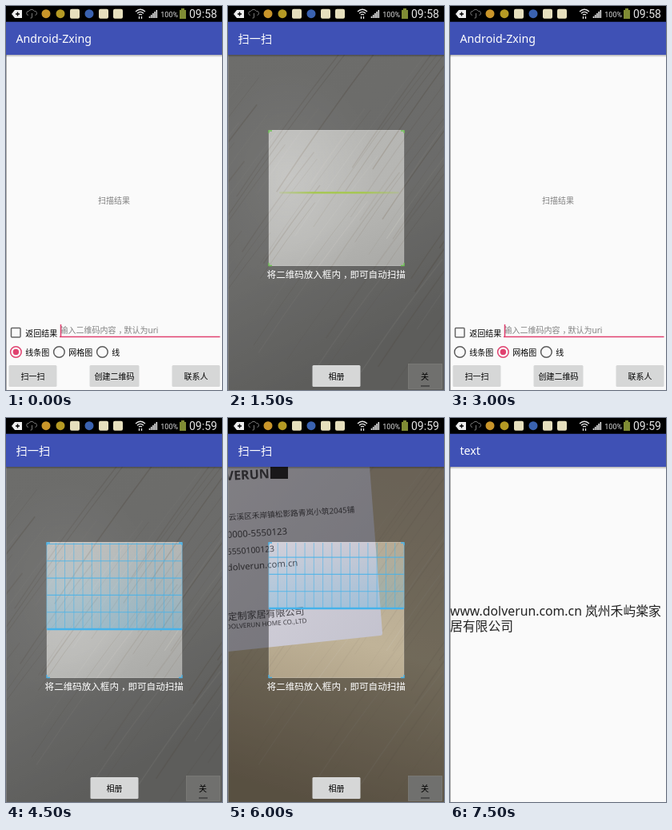
An HTML page that plays this animation: 270 px wide and 480 px high, repeating every 8 s.

```html
<!DOCTYPE html>
<html lang="zh">
<head>
<meta charset="utf-8">
<title>Scanner demo</title>
<style>
  html, body { margin: 0; width: 100%; height: 100%; overflow: hidden; background: #000; }
  svg { display: block; width: 100%; height: 100%; }
  text { font: 10px "Noto Sans", "Noto Sans CJK SC", "Noto Sans CJK", sans-serif; white-space: pre; }
  .mid { text-anchor: middle; }
  .title { font-size: 14.2px; fill: #fff; }
  .clock { font: 14px Roboto, sans-serif; fill: #e4e4e4; }
  .charge { font: 9px Roboto, sans-serif; fill: #ddd; }
  .result { font-size: 15.8px; fill: #222; }
  .grey { fill: #808080; }
</style>
</head>
<body>
<svg viewBox="0 0 270 480" preserveAspectRatio="none">
  <defs>
    <linearGradient id="desk" x1="0" y1="0" x2=".35" y2="1">
      <stop offset="0" stop-color="#b8b8b5"/><stop offset=".6" stop-color="#b6b6b3"/><stop offset="1" stop-color="#9d9d9a"/>
    </linearGradient>
    <linearGradient id="tan" x1=".6" y1="0" x2=".4" y2="1">
      <stop offset="0" stop-color="#b3a692"/><stop offset=".5" stop-color="#c0b398"/><stop offset="1" stop-color="#96876f"/>
    </linearGradient>
    <linearGradient id="paper" x1="0" y1="0" x2="1" y2="1">
      <stop offset="0" stop-color="#dad7df"/><stop offset="1" stop-color="#c3c2ce"/>
    </linearGradient>
    <radialGradient id="glare">
      <stop offset="0" stop-color="#fff" stop-opacity=".22"/><stop offset="1" stop-color="#fff" stop-opacity="0"/>
    </radialGradient>
    <linearGradient id="beam">
      <stop offset="0" stop-color="#a4c84a" stop-opacity=".2"/><stop offset=".3" stop-color="#a4c84a"/>
      <stop offset=".7" stop-color="#a4c84a"/><stop offset="1" stop-color="#a4c84a" stop-opacity=".2"/>
    </linearGradient>
    <linearGradient id="tint" x2="0" y2="1">
      <stop offset="0" stop-color="#45b2ea" stop-opacity="0"/><stop offset="1" stop-color="#45b2ea" stop-opacity=".28"/>
    </linearGradient>
    <linearGradient id="shadow" x2="0" y2="1">
      <stop offset="0" stop-opacity=".3"/><stop offset="1" stop-opacity="0"/>
    </linearGradient>
    <clipPath id="body"><rect y="61" width="270" height="419"/></clipPath>
    <g id="grain" fill="none"></g>
  </defs>

  <g id="home">
    <rect y="61" width="270" height="419" fill="#fafafa"/>
    <text class="mid grey" x="135" y="246.8">扫描结果</text>
    <rect x="6.5" y="402.5" width="11.5" height="11.5" rx="1" fill="none" stroke="#666" stroke-width="1.5"/>
    <text x="24.3" y="412.6">返回结果</text>
    <text class="grey" x="67.5" y="409.3">输入二维码内容<tspan dx="3">，</tspan><tspan dx="-3">默认为uri</tspan></text>
    <path d="M68.5 398V413M67 413.4H267.5" stroke="#e0416f" stroke-width="1.5"/>
    <g id="radios"></g>
    <g id="buttons"></g>
  </g>

  <g id="scan">
    <g clip-path="url(#body)">
      <g id="bareDesk">
        <rect y="61" width="270" height="419" fill="url(#desk)"/>
        <use href="#grain"/>
        <ellipse cx="75" cy="215" rx="110" ry="140" fill="url(#glare)"/>
      </g>
      <g id="cardDesk">
        <rect y="61" width="270" height="419" fill="url(#tan)"/>
        <use href="#grain" opacity=".5"/>
        <path d="M0 61H177L193 269Q193 272 190 272L0 292Z" fill="url(#paper)"/>
        <g id="cardText" fill="#47454b"></g>
        <rect x="53" y="61" width="22" height="15" fill="#2b292c"/>
      </g>
      <path d="M0 61H270V480H0ZM51 155V325H220V155Z" fill="#000" fill-opacity=".41" fill-rule="evenodd"/>
    </g>
    <rect id="beamLine" x="64" y="232.2" width="150" height="2.2" rx="1.1" fill="url(#beam)"/>
    <g id="mesh" fill="none" stroke="#45b2ea"></g>
    <rect x="51" y="155.5" width="169" height="169" fill="none" stroke="#ddd" stroke-opacity=".35" stroke-width=".7"/>
    <path d="M51 159V156H55M216 156H220V159M51 321V324.5H55M216 324.5H220V321" id="corners" fill="none" stroke-width="1.3"/>
    <text class="mid" x="135.2" y="340.3" fill="#fff" style="font-size:11.55px">将二维码放入框内<tspan dx="3">，</tspan><tspan dx="-3">即可自动扫描</tspan></text>
    <g id="scanButtons"></g>
    <rect x="225.5" y="447.5" width="42" height="31" fill="#70706e" stroke="#80807d" stroke-width=".7"/>
    <text class="mid" x="246" y="466.8">关</text>
    <path d="M241 475H252" stroke="#333" stroke-width="1.3"/>
  </g>

  <g id="result">
    <rect y="61" width="270" height="419" fill="#fafafa"/>
    <text class="result" x="0" y="247">www.dolverun.com.cn 岚州禾屿棠家</text>
    <text class="result" x="0" y="266">居有限公司</text>
  </g>

  <rect y="61" width=".7" height="419" fill="#888"/>
  <rect y="61" width="270" height="3" fill="url(#shadow)"/>
  <rect y="19.5" width="270" height="41.5" fill="#3f51b5"/>
  <text id="title" class="title" x="12.5" y="45.7"></text>

  <rect width="270" height="19.5" fill="#000"/>
  <path d="M7 10L11 5H20V15H11Z" fill="#eee"/>
  <path d="M14.5 7.5V12.5M12 10H17" stroke="#000" stroke-width="1.4"/>
  <path d="M28 11.5a2.5 2.5 0 0 1 .5-5a4 4 0 0 1 7 0a2.5 2.5 0 0 1 1 5M32.5 9V14q0 1.5-2 1" fill="none" stroke="#777"/>
  <g id="appIcons"></g>
  <g fill="none" stroke="#e4e4e4" stroke-width="1.3">
    <path d="M162 7Q168 1.5 174 7M164 9.3Q168 5.5 172 9.3M166 11.3Q168 9.5 170 11.3"/>
    <path d="M166.5 13V16M169.5 13V16"/>
    <path d="M179.5 15V13M181.7 15V11M183.9 15V9M186.1 15V7M188.3 15V5" stroke-width="1.6"/>
  </g>
  <text class="charge" x="193.3" y="13.7">100%</text>
  <path d="M217 5H219V3H223V5H225V16H217Z" fill="#808c34"/>
  <text id="clock" class="clock" x="229" y="15"></text>
</svg>

<script>
const $ = id => document.getElementById(id);
const LOOP = 8000, STEP = 1500;

const scenes = [
  { view: "home", title: "Android-Zxing", clock: "09:58", picked: 0 },
  { view: "scan", title: "扫一扫", clock: "09:58" },
  { view: "home", title: "Android-Zxing", clock: "09:58", picked: 1 },
  { view: "scan", title: "扫一扫", clock: "09:59", meshEnd: 264 },
  { view: "scan", title: "扫一扫", clock: "09:59", meshEnd: 238, card: true },
  { view: "result", title: "text", clock: "09:59" },
];

const button = (x, width, label) =>
  `<rect x="${x}" y="449" width="${width}" height="27" rx="1.5" fill="#d6d7d7"/>
   <text class="mid" x="${x + width / 2}" y="466.8">${label}</text>`;

function radio(label, index, picked) {
  const x = 12.4 + index * 54, on = index === picked;
  return `<circle cx="${x}" cy="432.5" r="6.8" fill="none" stroke="${on ? "#e0416f" : "#5c5c5c"}" stroke-width="1.5"/>
    ${on ? `<circle cx="${x}" cy="432.5" r="3.7" fill="#e0416f"/>` : ""}
    <text x="${x + 11.8}" y="436.6">${label}</text>`;
}

// Scan mesh: 15 columns, rows every 21.3 px up from the moving edge.
function mesh(end) {
  let cols = "", rows = "";
  for (let i = 0; i <= 15; i++) cols += `M${51 + i * 169 / 15} 156V${end}`;
  for (let y = end - 21.3; y > 155; y -= 21.3) rows += `M51 ${y}H220`;
  return `<rect x="51" y="156" width="169" height="${end - 156}" fill="url(#tint)" stroke="none"/>
    <path d="${cols}" stroke-width=".8" opacity=".7"/>
    <path d="${rows}" stroke-width="1.1" opacity=".8"/>
    <path d="M51 ${end}H220" stroke-width="2.4"/>`;
}

// Faint parallel wood grain, running up to the right, from a small seeded generator.
function grain() {
  let seed = 7, out = "";
  const random = () => (seed = seed * 16807 % 2147483647) / 2147483647;
  for (let i = 0; i < 75; i++) {
    const x = i * 7.3 - 260 + random() * 4, y = 480 - random() * 280, len = 90 + random() * 150;
    const left = x + (480 - y) * .72;
    out += `<path d="M${left} ${y}q${len * .33} ${-len * .5} ${len * .72} ${-len}"
      stroke="${i % 4 ? "#85796a" : "#d0cec8"}" stroke-width="${.7 + random()}" opacity="${.12 + random() * .22}"/>`;
  }
  return out;
}

const cardLine = (x, y, size, angle, label, weight = 400) =>
  `<text transform="translate(${x} ${y}) rotate(${angle})" style="font-size:${size}px;font-weight:${weight}">${label}</text>`;

const appIcon = (x, color, round) => round
  ? `<circle cx="${x}" cy="9.7" r="5.5" fill="${color}"/>`
  : `<rect x="${x - 6}" y="3.7" width="12" height="12" rx="2" fill="${color}"/>`;

$("buttons").innerHTML = button(3.5, 60, "扫一扫") + button(104.5, 62, "创建二维码") + button(207.5, 60, "联系人");
$("scanButtons").innerHTML = button(105.5, 60, "相册");
$("grain").innerHTML = grain();
$("appIcons").innerHTML = appIcon(50, "#c9952a", true) + appIcon(68, "#b59a24", true) + appIcon(86, "#e6dfbd") +
  appIcon(104, "#3a62b0", true) + appIcon(122, "#e6dfbd") + appIcon(140, "#e6dfbd");
$("cardText").innerHTML =
  cardLine(-3, 78, 16, -3, "VERUN", 700) +
  cardLine(1, 127.5, 9.7, -3.5, "云溪区禾岸镇松影路青岚小筑2045铺") +
  cardLine(-1, 150, 11.4, -3.5, "0000-5550123") +
  cardLine(-1, 171, 10.4, -4, "5550100123") +
  cardLine(-1, 191, 11.3, -4, "dolverun.com.cn", 500) +
  cardLine(0, 253, 12, -4.5, "定制家居有限公司") +
  cardLine(-2, 264, 8.1, -4.5, "DOLVERUN HOME CO.,LTD");

const show = (id, on) => $(id).style.display = on ? "" : "none";

function render(scene) {
  for (const id of ["home", "scan", "result"]) show(id, id === scene.view);
  $("title").textContent = scene.title;
  $("clock").textContent = scene.clock;
  $("radios").innerHTML = ["线条图", "网格图", "线"].map((label, i) => radio(label, i, scene.picked)).join("");
  show("bareDesk", !scene.card);
  show("cardDesk", scene.card);
  show("beamLine", !scene.meshEnd);
  $("mesh").innerHTML = scene.meshEnd ? mesh(scene.meshEnd) : "";
  $("corners").setAttribute("stroke", scene.meshEnd ? "#45b2ea" : "#6fc653");
}

let current;
const start = performance.now();
function tick() {
  const time = (performance.now() - start) % LOOP;
  const scene = scenes[Math.floor(time / STEP)];
  if (scene !== current) render(current = scene);
  requestAnimationFrame(tick);
}
tick();
</script>
</body>
</html>
```
